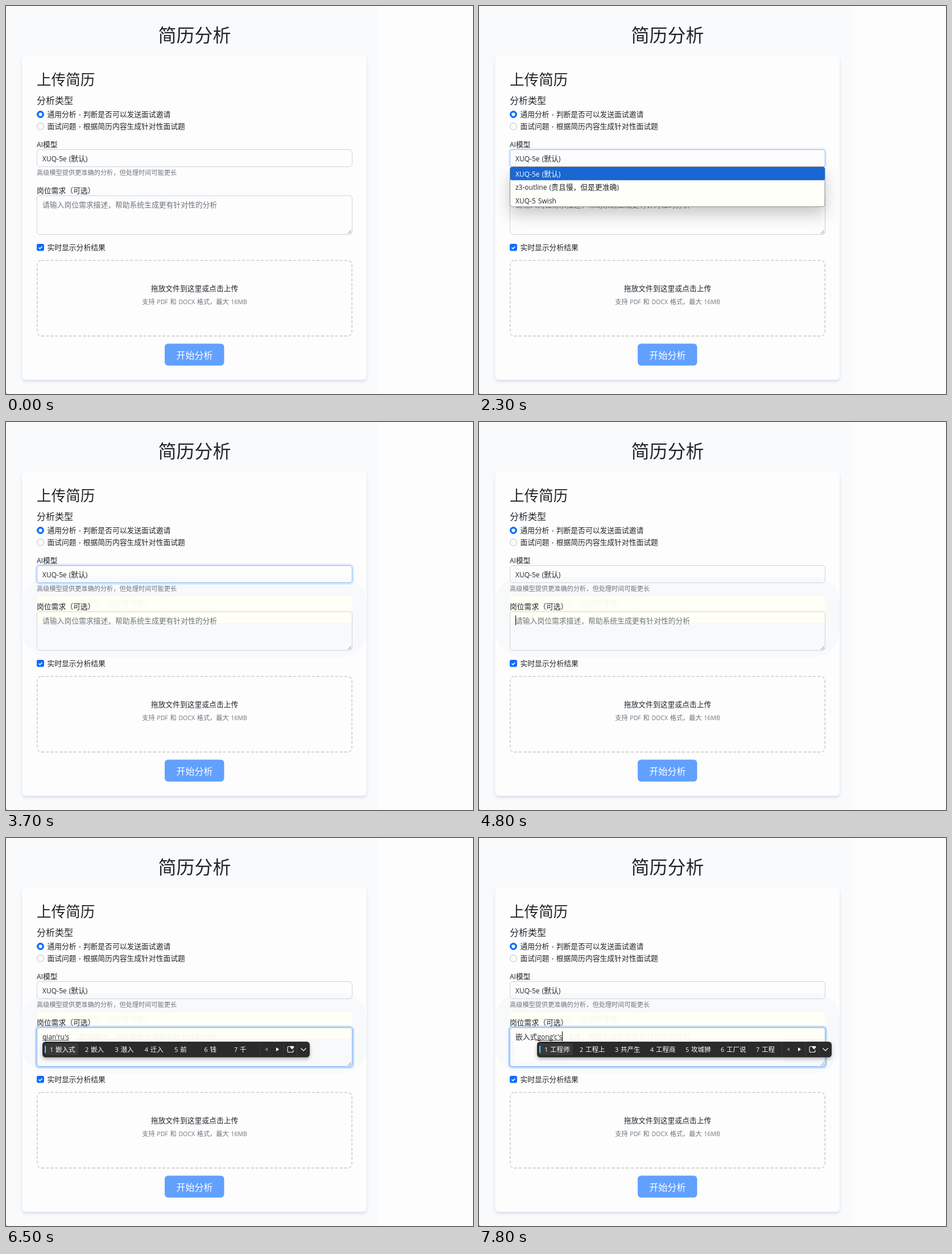
Animation, 821 px wide and 682 px high, one loop 8 s. Source, as an HTML page:

```html
<!DOCTYPE html>
<html lang="zh-CN">
<head>
<meta charset="utf-8">
<title>简历分析</title>
<style>
  html, body { margin: 0; width: 100%; height: 100%; overflow: hidden; background: #fdfdfd; }
  svg { display: block; font-family: "Open Sans", "Noto Sans CJK SC", "Noto Sans CJK", sans-serif; fill: #212529; }
  .latin { font-size: .94em; word-spacing: 1px; }
  .card { fill: #fdfdfd; filter: drop-shadow(0 3px 2.5px rgba(20, 50, 90, .13)); }
  .popup { filter: drop-shadow(0 14px 13px rgba(0, 0, 0, .2)); }
  .ime { filter: drop-shadow(0 3px 3px rgba(0, 0, 0, .28)); }
</style>
</head>
<body>
<svg id="stage" width="821" height="682" viewBox="0 0 821 682"></svg>
<script>
const LOOP = 8000;
const BLUE = "#0d6efd", MUTED = "#6c757d", BORDER = "#ced4da", WHITE = "#fdfdfd";
const OPTIONS = ["XUQ-5e (默认)", "z3-outline (贵且慢，但是更准确)", "XUQ-5 Swish"];
const PLACEHOLDER = "请输入岗位需求描述，帮助系统生成更有针对性的分析";
const NOTE = "\u{1F4B4}";

const words = list => list.split(" ");

// Each step changes some fields of the state from its time onwards.
const STEPS = [
  [0, { picked: 1, focus: 0, pressed: false, option: -1, selectRing: 0, areaRing: 0,
        caret: false, done: "", typing: "", picks: null, ghost: false, wiped: false }],
  [1400, { picked: 2, focus: 2 }],
  [1800, { focus: 1, pressed: true }],
  [1900, { picked: 1, pressed: false }],
  [2300, { focus: 0, option: 0, selectRing: .3 }],
  [2400, { selectRing: 1 }],
  [2700, { option: 1 }],
  [2800, { option: 2 }],
  [3200, { option: 1 }],
  [3300, { option: 0 }],
  [3700, { option: -1, selectRing: .5, ghost: true }],
  [3800, { selectRing: 0 }],
  [4800, { caret: true }],
  [4900, { areaRing: .6 }],
  [5000, { areaRing: 1 }],
  [5300, { caret: false }],
  [5500, { caret: true, typing: "q", picks: words("去 请 前 起 全 钱 其") }],
  [5600, { typing: "qi", picks: words("起 其 期 气 七 奇 器") }],
  [5700, { typing: "qian", picks: ["钱", "前", "千", "签", NOTE, ["( $ _ $ )", 39.5], "欠"] }],
  [5900, { typing: "qian'ru", picks: words("嵌入 潜入 迁入 牵入 前 钱 千") }],
  [6100, { typing: "qian'ru's", picks: words("嵌入式 嵌入 潜入 迁入 前 钱 千") }],
  [6500, { caret: false }],
  [6900, { caret: true, done: "嵌入式", typing: "", picks: null, wiped: true }],
  [7300, { typing: "go", picks: ["共", "狗", "工", "公", ["<(￣︶￣)↗[GO!]", 91.5], "够", "宫"] }],
  [7400, { typing: "gon", picks: words("工 公 共 宫 功 供 攻") }],
  [7600, { typing: "gong", picks: words("工 公 共 宫 功 供 攻") }],
  [7700, { typing: "gong'c", picks: words("工程 工厂 公厕 共 工 公 宫") }],
  [7800, { typing: "gong'c's", picks: words("工程师 工程上 共产生 工程商 攻城狮 工厂说 工程") }],
];

const latin = s => s.replace(/[ -~]+/g, run =>
  `<tspan class="latin">${run.replace(/&/g, "&amp;").replace(/</g, "&lt;")}</tspan>`);

// Text whose glyphs are centred on the height cy.
const text = (x, cy, size, s, attrs = "") =>
  `<text x="${x}" y="${cy + size * .38}" font-size="${size}" ${attrs}>${latin(s)}</text>`;
const fill = color => `fill="${color}"`;
const centred = (cy, size, s, attrs = "") =>
  text(331.5, cy, size, s, `text-anchor="middle" ${attrs}`);

const rect = (x, y, w, h, r, attrs) =>
  `<rect x="${x}" y="${y}" width="${w}" height="${h}" rx="${r}" ${attrs}/>`;
const path = (d, color, width = 1) =>
  `<path d="${d}" fill="none" stroke="${color}" stroke-width="${width}"/>`;

function radio(index, cy, s) {
  const on = s.picked === index, focus = s.focus === index;
  const ring = focus
    ? `<circle cx="60.5" cy="${cy}" r="8" fill="none" stroke="${BLUE}" stroke-opacity=".25" stroke-width="3.2"/>` : "";
  const inner = on ? BLUE : focus && s.pressed ? "#e5e5e5" : WHITE;
  const edge = on ? BLUE : focus ? "#86b7fe" : "#b9bec4";
  return ring +
    `<circle cx="60.5" cy="${cy}" r="6" fill="${inner}" stroke="${edge}"/>` +
    (on ? `<circle cx="60.5" cy="${cy}" r="3.1" fill="#fff"/>` : "");
}

function field(y, h, ring) {
  const glow = ring && rect(52.5, y - 1.5, 558, h + 3, 6.5,
    `fill="none" stroke="${BLUE}" stroke-opacity="${.25 * ring}" stroke-width="3"`);
  return (glow || "") +
    rect(54.5, y + .5, 554, h - 1, 4.5, `fill="none" stroke="${ring ? "#86b7fe" : BORDER}"`);
}

function residue(s) {
  if (!s.ghost) return "";
  return rect(28.5, 272, 605.5, 141, 46, fill("#f8f9fb")) +
    rect(55, 306, 553, 47, 0, fill("#fffff5")) +
    text(64, 318.5, 12.8, OPTIONS[1], fill("#f8f8f3")) +
    (s.wiped ? rect(62, 353, 474, 42, 0, fill(WHITE)) : "");
}

function popup(s) {
  if (s.option < 0) return "";
  const top = 283, row = 23.2;
  return `<g class="popup">` +
    rect(54.5, top - .5, 553.5, 70.3, 4.5, `fill="#fffffa" stroke="#8a8a8a"`) + `</g>` +
    rect(55, top + s.option * row, 553, row, s.option === 1 ? 0 : 3, fill("#1967d2")) +
    OPTIONS.map((name, i) =>
      text(64, top + 12.4 + i * row, 12.8, name, fill(i === s.option ? "#fff" : "#212529"))).join("");
}

function ime(left, picks) {
  let x = left + 13, cells = "", total = 0, mark = 0;
  picks.forEach((pick, i) => {
    const [label, width] = Array.isArray(pick) ? pick : [pick, 11.5 * [...pick].length];
    const pitch = Math.max(52.4, width + 27.5);
    mark = mark || pitch - 2.5;
    cells += text(x, 371.5, 11.5, String(i + 1), fill("#fff"));
    cells += label === NOTE
      ? rect(x + 12, 367.5, 12, 8, 1, fill("#e8a33c")) + rect(x + 16, 369.5, 4, 4, 2, fill("#fbe2a4"))
      : text(x + 10, 371.5, 11.5, label, fill("#fff"));
    x += pitch;
    total += pitch;
  });
  const d = left + total + 5.6;
  const bar = dx => path(`M${d + dx} 360V384`, "#3d3d3d");
  return `<g class="ime">` + rect(left, 358, total + 93.6, 27.5, 5.5, `fill="#2b2b2b"`) + `</g>` +
    rect(left + 3.5, 361, mark, 21, 4, fill("#393939")) +
    rect(left + 4, 365, 2.2, 13, 1, fill("#4cc2ff")) + cells +
    bar(0) + bar(42) + bar(65) +
    `<path d="M${d + 14} 368v7l-5-3.5z" fill="#777"/><path d="M${d + 29} 368v7l5-3.5z" fill="#fff"/>` +
    path(`M${d + 54} 366.5h-3a2 2 0 0 0-2 2v6a2 2 0 0 0 2 2h6a2 2 0 0 0 2-2v-2`, "#fff", 1.1) +
    `<path d="M${d + 57} 371.5l-3-3a1.8 1.8 0 0 1 3-2.2a1.8 1.8 0 0 1 3 2.2z" fill="#fff"/>` +
    path(`M${d + 72.5} 369.5l4.5 4.5l4.5-4.5`, "#fff", 1.2);
}

function scene(s) {
  const empty = !s.done && !s.typing;
  const start = 64 + s.done.length * 12.8;
  return rect(0, 0, 821, 682, 0, fill(WHITE)) +
    rect(0, 0, 655, 682, 0, fill("#f8fafb")) +
    `<path d="M0 679q0 3 3 3h-3z" fill="#777"/>` +
    centred(50.5, 32, "简历分析") +
    rect(28.5, 86.5, 605.5, 570.5, 7, `class="card"`) +
    residue(s) +
    text(54, 129.5, 25.6, "上传简历") +
    text(54, 166, 16, "分析类型") +
    radio(1, 190.5, s) + text(72.4, 190, 12.8, "通用分析 - 判断是否可以发送面试邀请") +
    radio(2, 211.5, s) + text(72.4, 211, 12.8, "面试问题 - 根据简历内容生成针对性面试题") +
    text(54, 243.2, 12.8, "AI模型") +
    field(252, 31, s.selectRing) + text(64, 268, 12.8, OPTIONS[0]) +
    text(54, 293, 11.2, "高级模型提供更准确的分析，但处理时间可能更长", fill(MUTED)) +
    text(54, 324.2, 12.8, "岗位需求（可选）") +
    text(64, 349, 12.8, PLACEHOLDER, fill(empty ? MUTED : "#f5f5ef")) +
    (empty ? "" : rect(62, 340, start - 60 + s.typing.length * 6.4, 17, 0, fill("#fefefa"))) +
    field(333, 69, s.areaRing) +
    path("M601 400l6-6M604.5 400l2.5-2.5", "#777", .9) +
    text(64, 349, 12.8, s.done + s.typing, `id="typed"`) +
    `<path id="underline" stroke="#212529" stroke-width=".9"/>` +
    (s.caret ? rect(64, 340, 1, 17, 0, `id="caret" fill="#000"`) : "") +
    rect(54, 418, 13, 12.6, 3, fill(BLUE)) +
    path("M57.6 424.6l2.1 2.1l3.9-4", "#fff", 1.5) +
    text(72.4, 424, 12.8, "实时显示分析结果") +
    rect(54.8, 447.3, 553.4, 132.8, 7.5,
      `fill="none" stroke="#cccccc" stroke-width="1.6" stroke-dasharray="5 3.2"`) +
    centred(496, 12.8, "拖放文件到这里或点击上传") +
    centred(520.2, 11.2, "支持 PDF 和 DOCX 格式，最大 16MB", fill(MUTED)) +
    rect(279, 593.5, 104.5, 38.5, 6, fill("#62a0fe")) +
    centred(613.5, 16, "开始分析", fill("#fff")) +
    popup(s) +
    (s.picks ? ime(Math.floor(start), s.picks) : "");
}

const stage = document.getElementById("stage");
const find = id => document.getElementById(id);
let shown = -1;

function draw(index) {
  const state = Object.assign({}, ...STEPS.slice(0, index + 1).map(step => step[1]));
  stage.innerHTML = scene(state);
  const length = state.done || state.typing ? find("typed").getComputedTextLength() : 0;
  if (state.caret) find("caret").setAttribute("x", Math.round(64 + length));
  if (state.typing)
    find("underline").setAttribute("d", `M${64 + state.done.length * 12.8} 355.5H${64 + length}`);
}

function tick() {
  const time = performance.now() % LOOP;
  const index = STEPS.filter(step => step[0] <= time).length - 1;
  if (index !== shown) draw(shown = index);
  requestAnimationFrame(tick);
}
tick();
</script>
</body>
</html>
```
